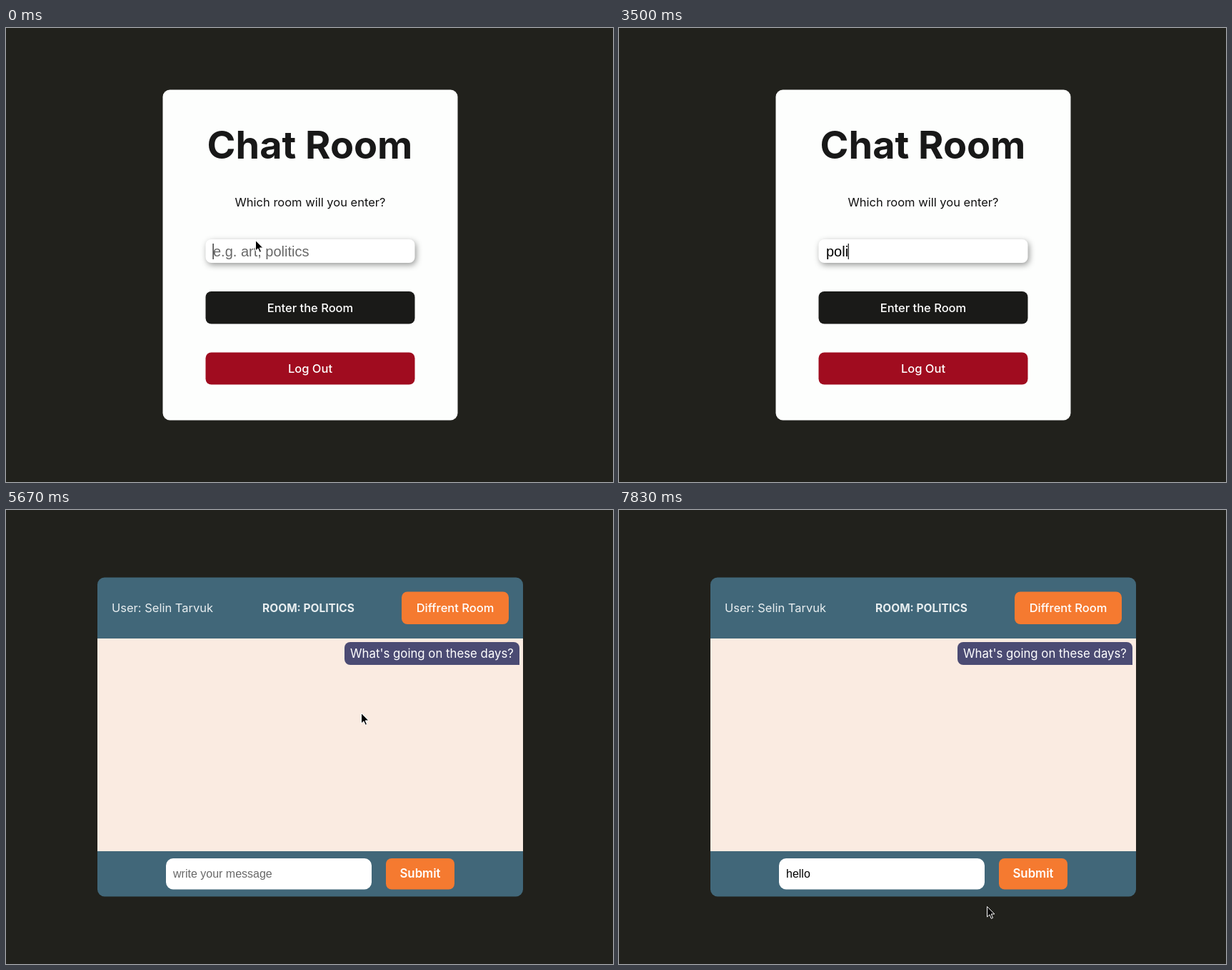
These frames come from a looping animation (850 px wide and 636 px high, 8000 ms). An HTML page:

```html
<!DOCTYPE html>
<html lang="en">
<head>
<meta charset="utf-8">
<title>Chat room</title>
<style>
  html, body { margin: 0; width: 100%; height: 100%; overflow: hidden; background: #21211c; }
  svg { display: block; width: 850px; height: 636px; }
  text { font: 400 16.5px Inter, sans-serif; fill: #fff; }
  .mid { text-anchor: middle; }
  .medium { font-weight: 500; }
  .dark { fill: #111; }
  .field { font-family: "Liberation Sans", Arial, sans-serif; }
  .shadow { filter: drop-shadow(2px 3px 4px #0006); }
</style>
</head>
<body>
<svg viewBox="0 0 850 636">
  <g id="lobby">
    <rect x="219.5" y="86.5" width="413" height="463" rx="10" fill="#fdfefd"/>
    <text class="mid" x="425.5" y="183" style="font-size:54px;font-weight:700;fill:#181818">Chat Room</text>
    <text class="mid dark" x="426" y="250">Which room will you enter?</text>
    <rect class="shadow" x="279.5" y="296" width="293" height="33" rx="8" fill="#fff"/>
    <rect x="279.5" y="369" width="293" height="45.5" rx="8" fill="#1a1a18"/>
    <text class="mid medium" x="426" y="398">Enter the Room</text>
    <rect x="279.5" y="454.5" width="293" height="45" rx="8" fill="#a00c1f"/>
    <text class="mid medium" x="426" y="483">Log Out</text>
    <text class="field" id="roomText" x="290" y="320" style="font-size:20px"/>
  </g>
  <g id="chat">
    <rect x="128" y="94.5" width="596" height="447" rx="10" fill="#416779"/>
    <rect x="128" y="180" width="596" height="298" fill="#faebe1"/>
    <text x="148" y="143" style="fill:#e8eef0">User: Selin Tarvuk</text>
    <text class="mid" x="423.5" y="143" style="font-size:15.5px;font-weight:700;fill:#e8eef0">ROOM: POLITICS</text>
    <rect x="554" y="114.5" width="150" height="45.5" rx="8" fill="#f57a30"/>
    <text class="mid medium" x="629" y="143">Diffrent Room</text>
    <g id="message">
      <path d="M482 185H711a8 8 0 0 1 8 8V217H482a8 8 0 0 1-8-8V193a8 8 0 0 1 8-8Z" fill="#4b4b73"/>
      <text class="mid" x="596.5" y="206.5" style="font-size:16.8px">What's going on these days?</text>
    </g>
    <rect x="224" y="488" width="288" height="43.5" rx="10" fill="#fff"/>
    <rect x="532" y="488" width="96" height="43.5" rx="8" fill="#f57a30"/>
    <text class="mid" x="580" y="515" style="font-size:16.8px;font-weight:600">Submit</text>
    <text class="field" id="chatText" x="234" y="515" style="font-size:16px"/>
  </g>
  <rect id="caret" width="1.2" fill="#111"/>
  <path id="pointer" d="M0 0V14.5L3.4 11.4 5.8 16.8 8 15.8 5.7 10.5H10.3Z" fill="#000" stroke="#fff"/>
</svg>
<script>
const LOOP = 8000;
const $ = id => document.getElementById(id);
const show = (el, on) => el.setAttribute('visibility', on ? 'visible' : 'hidden');

const roomKeys = [3000, 3170, 3330, 3500, 3670, 4170, 4330, 4500];
const chatKeys = [6670, 6830, 7000, 7170, 7330];

// Pointer stops: time, x, y; no position means hidden.
const stops = [
  [0, 349.5, 297.5], [170, 349.5, 312.5], [3000],
  [5500, 497.5, 262], [5670, 497.5, 284.5], [5830, 496, 350], [6000, 492, 440], [6170, 490, 505],
  [6670], [7500, 494, 515], [7670, 506, 538], [7830, 515.5, 555.5]
];

function fill(el, word, keys, hint, t) {
  const typed = word.slice(0, keys.filter(k => k <= t).length);
  el.textContent = typed || hint;
  el.style.fill = typed ? '#000' : '#686868';
  return typed ? el.getComputedTextLength() : 0;
}

function placeCaret(x, y, height) {
  const caret = $('caret');
  caret.setAttribute('x', x);
  caret.setAttribute('y', y);
  caret.setAttribute('height', height);
}

function draw(t) {
  const inChat = t >= 5170;
  $('lobby').style.display = inChat ? 'none' : '';
  $('chat').style.display = inChat ? '' : 'none';
  if (inChat) {
    show($('message'), t >= 5330);
    const width = fill($('chatText'), 'hello', chatKeys, 'write your message', t);
    placeCaret(233.5 + width, 501, 17.5);
    show($('caret'), t >= 6330 && t < 7830);
  } else {
    const width = fill($('roomText'), 'politics', roomKeys, 'e.g. art, politics', t);
    placeCaret(289.5 + width, 302, 22);
    show($('caret'), t < 2670 || t >= 3000);
  }
  const [, x, y] = stops.filter(s => s[0] <= t).pop();
  show($('pointer'), x !== undefined);
  if (x !== undefined) $('pointer').setAttribute('transform', `translate(${x} ${y})`);
}

const start = performance.now();
function tick() {
  draw((performance.now() - start) % LOOP);
  requestAnimationFrame(tick);
}
tick();
</script>
</body>
</html>
```
